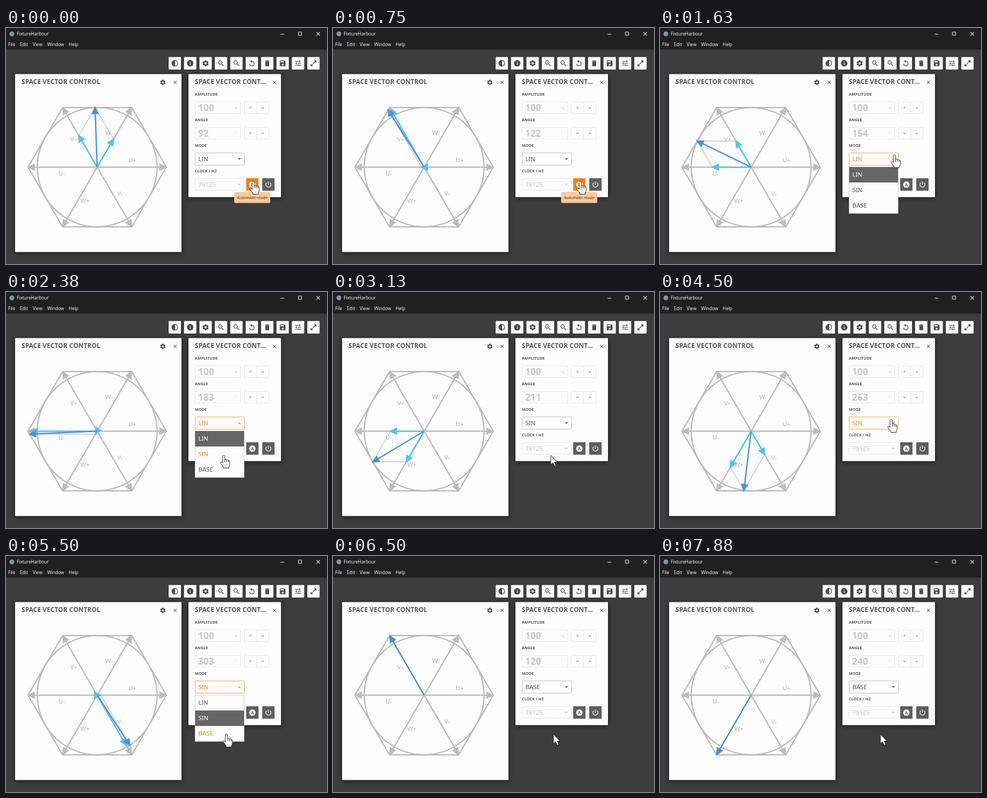
An HTML page that plays this animation: 600x443 px, repeating every 8010 ms.

```html
<!DOCTYPE html>
<html lang="en">
<head>
<meta charset="utf-8">
<title>Space vector control</title>
<style>
  html, body { margin: 0; width: 100%; height: 100%; overflow: hidden; background: #3d3d3d; }
  svg { display: block; }
  text { font-family: 'Noto Sans', sans-serif; font-size: 11.4px; fill: #555; }
  .menu text { font-family: 'Open Sans', sans-serif; font-size: 8.4px; fill: #fff; }
  .panel { fill: #fdfdfd; filter: drop-shadow(0 2px 4px #0009); }
  .title { font-size: 12px; font-weight: 600; letter-spacing: .05px; }
  .label { font-size: 7.2px; font-weight: 600; letter-spacing: .1px; }
  .value { font-size: 17.4px; font-weight: 600; fill: #c9c9c9; }
  .pale { fill: #c4c4c4; }
  .box { fill: none; stroke: #e6e6e6; }
  .grid { fill: none; stroke: #bcbcbc; stroke-width: 2.5; }
  .axis { stroke: #bcbcbc; fill: #bcbcbc; }
  .axisname { fill: #b2b2b2; }
  .part { stroke: #4bc5f2; fill: #4bc5f2; }
  .sum { stroke: #4a93d8; fill: #4a93d8; }
</style>
</head>
<body>
<svg id="stage" width="600" height="443" viewBox="0 0 600 443"></svg>
<script>
const CX = 170.4, CY = 261.3, SIDE = 129.3, INNER = SIDE * Math.sqrt(3) / 2;
const ORANGE = '#e8871e', MODES = ['LIN', 'SIN', 'BASE'];
const rad = deg => deg * Math.PI / 180;

const lens = 'M15.5 14h-.79l-.28-.27C15.41 12.59 16 11.11 16 9.5 16 5.91 13.09 3 9.5 3S3 5.91 3 9.5 5.91 16 9.5 16c1.61 0 3.09-.59 4.23-1.57l.27.28v.79l5 4.99L20.49 19l-4.99-5zm-6 0C7.01 14 5 11.99 5 9.5S7.01 5 9.5 5 14 7.01 14 9.5 11.99 14 9.5 14z';
const icons = {
  contrast: 'M12 22c5.52 0 10-4.48 10-10S17.52 2 12 2 2 6.48 2 12s4.48 10 10 10zm1-17.93c3.94.49 7 3.85 7 7.93s-3.05 7.44-7 7.93V4.07z',
  info: 'M12 2C6.48 2 2 6.48 2 12s4.48 10 10 10 10-4.48 10-10S17.52 2 12 2zm1 15h-2v-6h2v6zm0-8h-2V7h2v2z',
  gear: 'M19.14 12.94c.04-.3.06-.61.06-.94 0-.32-.02-.64-.07-.94l2.03-1.58c.18-.14.23-.41.12-.61l-1.92-3.32c-.12-.22-.37-.29-.59-.22l-2.39.96c-.5-.38-1.03-.7-1.62-.94l-.36-2.54c-.04-.24-.24-.41-.48-.41h-3.84c-.24 0-.43.17-.47.41l-.36 2.54c-.59.24-1.13.57-1.62.94l-2.39-.96c-.22-.08-.47 0-.59.22L2.74 8.87c-.12.21-.08.47.12.61l2.03 1.58c-.05.3-.09.63-.09.94s.02.64.07.94l-2.03 1.58c-.18.14-.23.41-.12.61l1.92 3.32c.12.22.37.29.59.22l2.39-.96c.5.38 1.03.7 1.62.94l.36 2.54c.05.24.24.41.48.41h3.84c.24 0 .44-.17.47-.41l.36-2.54c.59-.24 1.13-.56 1.62-.94l2.39.96c.22.08.47 0 .59-.22l1.92-3.32c.12-.22.07-.47-.12-.61l-2.01-1.58zM12 15.6c-1.98 0-3.6-1.62-3.6-3.6s1.62-3.6 3.6-3.6 3.6 1.62 3.6 3.6-1.62 3.6-3.6 3.6z',
  zoomIn: lens + 'M12 10h-2v2H9v-2H7V9h2V7h1v2h2v1z',
  zoomOut: lens + 'M7 9h5v1H7z',
  reset: 'M12 5V1L7 6l5 5V7c3.31 0 6 2.69 6 6s-2.69 6-6 6-6-2.69-6-6H4c0 4.42 3.58 8 8 8s8-3.58 8-8-3.58-8-8-8z',
  trash: 'M6 19c0 1.1.9 2 2 2h8c1.1 0 2-.9 2-2V7H6v12zM19 4h-3.5l-1-1h-5l-1 1H5v2h14V4z',
  save: 'M17 3H5c-1.11 0-2 .9-2 2v14c0 1.1.89 2 2 2h14c1.1 0 2-.9 2-2V7l-4-4zm-5 16c-1.66 0-3-1.34-3-3s1.34-3 3-3 3 1.34 3 3-1.34 3-3 3zm3-10H5V5h10v4z',
  tune: 'M3 17v2h6v-2H3zM3 5v2h10V5H3zm10 16v-2h8v-2h-8v-2h-2v6h2zM7 9v2H3v2h4v2h2V9H7zm14 4v-2H11v2h10zm-6-4h2V7h4V5h-4V3h-2v6z',
  expand: 'M21 11V3h-8l3.29 3.29-10 10L3 13v8h8l-3.29-3.29 10-10z'
};
const power = 'M13 3h-2v10h2V3zm4.83 2.17l-1.42 1.42C17.99 7.86 19 9.81 19 12c0 3.87-3.13 7-7 7s-7-3.13-7-7c0-2.19 1.01-4.14 2.58-5.42L6.17 5.17C4.23 6.82 3 9.26 3 12c0 4.97 4.03 9 9 9s9-4.03 9-9c0-2.74-1.23-5.18-3.17-6.83z';

// Markup helpers
const text = (x, y, s, attrs = '') => `<text x="${x}" y="${y}" ${attrs}>${s}</text>`;
const rect = (x, y, w, h, attrs = '') => `<rect x="${x}" y="${y}" width="${w}" height="${h}" ${attrs}/>`;
const icon = (d, x, y, size, fill = '#4c4c4c') =>
  `<path d="${d}" fill="${fill}" transform="translate(${x - size / 2} ${y - size / 2}) scale(${size / 24})"/>`;
const cross = (x, y, r, color) =>
  `<path d="M${x - r} ${y - r}l${2 * r} ${2 * r}m0 ${-2 * r}l${-2 * r} ${2 * r}" stroke="${color}" stroke-width="1.1"/>`;
const caret = (x, y, up) => `M${x - 3} ${y + (up ? 1.5 : -1.5)}h6l-3 ${up ? -3 : 3}z`;
const arrowPath = len => `M0 0H${Math.max(0, len - 6)}M${len} 0l-11 -5v10z`;
const arrow = (attrs, len = 0, deg = 0) =>
  `<path ${attrs} d="${arrowPath(len)}" stroke-width="2.5" transform="translate(${CX} ${CY}) rotate(${-deg})"/>`;
const corners = [0, 60, 120, 180, 240, 300];
const at = (len, deg) => [CX + len * Math.cos(rad(deg)), CY - len * Math.sin(rad(deg))];

const numberField = (y, id, value, unit) =>
  rect(353.5, y + .5, 85, 22, 'class="box"') +
  text(359, y + 18, value, `class="value" id="${id}"`) +
  text(427, y + 14.5, unit, 'class="pale" style="font-size:7px"') +
  rect(445.5, y + .5, 46, 22, 'class="box"') +
  `<path class="box" d="M468.5 ${y}v23"/><path fill="#aaa" d="${caret(457, y + 12)}${caret(480, y + 11.5, true)}"/>`;

document.getElementById('stage').innerHTML = `
  <rect width="600" height="443" fill="#3d3d3d"/>
  <rect width="600" height="40.5" fill="#202020"/>
  <g class="menu">
    <circle cx="11" cy="11" r="4.5" fill="#7d98a6"/>
    ${text(20, 14, 'FixtureHarbour')}
    ${[[4, 'File'], [26, 'Edit'], [50, 'View'], [77, 'Window'], [117, 'Help']].map(([x, s]) => text(x, 34, s)).join('')}
  </g>
  <path d="M513 11.5h7M546.5 7.5h6v6h-6z" fill="none" stroke="#eee"/>${cross(583.5, 11, 3.3, '#eee')}
  ${Object.values(icons).map((d, i) => {
    const x = 315.5 + 28.8 * i;
    return rect(x - 11.5, 54.5, 23, 23.5, 'fill="#fdfdfd" rx="1"') + icon(d, x, 66.3, 14.5);
  }).join('')}

  ${rect(17, 86.5, 311, 334, 'class="panel" rx="1"')}
  ${text(29, 105, 'SPACE VECTOR CONTROL', 'class="title"')}
  ${icon(icons.gear, 293.2, 102, 12.5)}${cross(316.3, 102, 2.6, '#555')}
  <polygon class="grid" points="${corners.map(a => at(SIDE, a)).join(' ')}"/>
  <circle class="grid" cx="${CX}" cy="${CY}" r="${INNER}"/>
  <g stroke-width="2.5">${corners.map(a => arrow('class="axis" style="stroke-linejoin:miter" stroke-opacity="1"', SIDE - 1, a)).join('')}</g>
  ${[[229, 252, 'U+'], [98, 276.5, 'U-'], [120, 213, 'V+'], [185.5, 201, 'W-'], [208, 315, 'V-'], [139, 327.5, 'W+']]
    .map(([x, y, s]) => text(x, y, s, 'class="axisname"')).join('')}
  <path id="frame" fill="none" stroke="#bcbcbc" stroke-width="1.2"/>
  ${arrow('id="partA" class="part"')}${arrow('id="partB" class="part"')}${arrow('id="sum" class="sum"')}

  ${rect(341, 86.5, 173, 231, 'class="panel" rx="1"')}
  ${text(353, 105, 'SPACE VECTOR CONT…', 'class="title"')}${cross(502, 102, 2.6, '#555')}
  ${['AMPLITUDE', 'ANGLE', 'MODE', 'CLOCK / HZ'].map((s, i) => text(353, 127 + 48 * i, s, 'class="label"')).join('')}
  ${numberField(138, 'amplitude', 100, '%')}${numberField(186, 'angle', '', '°')}
  ${rect(353.5, 234.5, 92, 23, 'id="select" fill="#fdfdfd" rx="1"')}
  ${text(359.5, 249.5, '', 'id="mode"')}<path id="caret"/>
  ${rect(353.5, 282.5, 91, 22, 'class="box"')}
  ${text(359.5, 297.8, '78125', 'class="pale"')}<path class="pale" d="${caret(436, 294)}"/>
  ${rect(449, 282, 23, 23.5, 'id="auto" rx="1"')}
  <circle cx="460.5" cy="294" r="6" fill="#fff"/>
  ${text(460.5, 297.1, 'A', 'id="autoA" text-anchor="middle" style="font-size:8.5px;font-weight:700"')}
  ${rect(479, 282, 23, 23.5, 'fill="#5e5e5e" rx="1"')}${icon(power, 490.5, 294, 14, '#fff')}
  <g id="list">
    ${rect(353.5, 261, 91.5, 87, 'fill="#fdfdfd" stroke="#ccc"')}
    ${MODES.map((s, i) => rect(353.5, 261 + 29 * i, 91.5, 29, 'class="row"') + text(359.5, 279 + 29 * i, s, 'class="item"')).join('')}
  </g>
  <g id="tip">
    ${rect(426.5, 308, 67.5, 20.5, 'rx="3" fill="#f8ca98"')}
    ${text(432, 320.7, 'Automatic mode', 'style="font-size:7.3px;fill:#333"')}
  </g>
  <g id="pointer" fill="#fff" stroke="#222" stroke-linejoin="round">
    <path id="hand" d="M-2 1.5C-2-.8 2-.8 2 1.5V8.5C3-.0 0 0 2 8.5C3 7 5.3 7.4 5.5 9.2C6.6 8 8.6 8.6 8.8 10.2C10 9.4 11.3 10.2 11.2 12V17C11.2 20 9.5 20.5 9.3 24H-.2C-.5 21-3.5 18.5-6 14.3C-6.8 12.5-4.6 11.5-3.3 13L-2 14.5ZM2 8.5V13M5.5 9.2V13M8.8 10.2V13.5"/>
    <path id="plain" d="M0 0V17.8L4.1 14.1 6.9 20.6 9.8 19.3 7 13H12.4Z"/>
  </g>`;

const el = Object.fromEntries([...document.querySelectorAll('[id]')].map(e => [e.id, e]));
const rows = document.querySelectorAll('.row'), items = document.querySelectorAll('.item');
const set = (e, attrs) => { for (const k in attrs) e.setAttribute(k, attrs[k]); };
const show = (e, on) => set(e, { visibility: on ? 'visible' : 'hidden' });
el.hand.setAttribute('d', 'M-2 1.5C-2-.8 2-.8 2 1.5V8.5C3 7 5.3 7.4 5.5 9.2C6.6 8 8.6 8.6 8.8 10.2C10 9.4 11.3 10.2 11.2 12V17C11.2 20 9.5 20.5 9.3 24H-.2C-.5 21-3.5 18.5-6 14.3C-6.8 12.5-4.6 11.5-3.3 13L-2 14.5ZM2 8.5V13M5.5 9.2V13M8.8 10.2V13.5');

const LOOP = 8010, STEP = 125, BASE_START = 5625;
const angleKeys = [[0, 92], [750, 122], [1625, 154], [3125, 211], [4500, 263], [5500, 303], [5625, 308]];
const pointerKeys = [[0, 462, 288], [875, 462, 288], [1375, 438, 238], [1750, 438, 238], [2125, 407, 306.5],
  [3750, 407, 306.5], [4375, 432, 239.5], [4875, 432, 239.5], [5375, 412, 334.5], [LOOP, 412, 334.5]];

function sample(keys, t, ease = u => u) {
  const i = Math.max(1, keys.findIndex(k => k[0] > t)), a = keys[i - 1], b = keys[i];
  const u = ease(Math.min(1, (t - a[0]) / (b[0] - a[0])));
  return a.slice(1).map((v, j) => v + (b[j + 1] - v) * u);
}

function drawVectors(mode, angle) {
  const d = angle % 60, first = angle - d, base = mode === 2;
  const len = base ? SIDE - 1 : mode ? INNER : INNER / Math.cos(rad(d - 30));
  const a = len * Math.sin(rad(60 - d)) / Math.sin(rad(60));
  const b = len * Math.sin(rad(d)) / Math.sin(rad(60));
  const place = (e, l, deg) => set(e, { d: arrowPath(l), transform: `translate(${CX} ${CY}) rotate(${-deg})` });
  place(el.sum, len, angle);
  place(el.partA, a, first);
  place(el.partB, b, first + 60);
  set(el.frame, { d: `M${at(a, first)}L${at(len, angle)}L${at(b, first + 60)}` });
  for (const e of [el.partA, el.partB, el.frame]) show(e, !base);
}

function draw(now) {
  const t = Math.min(63, Math.floor(now % LOOP / STEP)) * STEP;
  const mode = t >= BASE_START ? 2 : t >= 2500 ? 1 : 0;
  const open = t >= 1500 && t < 2500 || t >= 4625 && t < BASE_START;
  const angle = mode === 2 ? 60 * (1 + Math.floor((t - BASE_START) / 750)) : sample(angleKeys, t)[0];
  drawVectors(mode, angle);
  el.angle.textContent = Math.round(angle);

  const [x, y] = sample(pointerKeys, t, u => u * u * (3 - 2 * u));
  const inside = (l, tp, r, b) => x >= l && x <= r && y >= tp && y <= b;
  const onAuto = inside(449, 282, 472, 305), onSelect = inside(353, 234, 445, 258);
  const hovered = open && inside(353, 261, 445, 348) ? Math.floor((y - 261) / 29) : -1;
  const clickable = onAuto || onSelect || hovered >= 0;
  set(el.pointer, { transform: `translate(${x} ${y})` });
  show(el.hand, clickable);
  show(el.plain, !clickable);

  const hot = open || onSelect;
  set(el.select, { stroke: hot ? '#efa84f' : '#bdbdbd' });
  el.mode.textContent = MODES[mode];
  el.mode.style.fill = hot ? ORANGE : '#555';
  set(el.caret, { d: caret(436.3, 246, open), fill: hot ? ORANGE : '#555' });
  show(el.list, open);
  items.forEach((item, i) => {
    set(rows[i], { fill: i === mode ? '#666' : 'none' });
    item.style.fill = i === mode ? '#fff' : i === hovered ? ORANGE : '#555';
  });

  const autoColor = onAuto ? '#f5820f' : '#5e5e5e';
  set(el.auto, { fill: autoColor });
  el.autoA.style.fill = autoColor;
  show(el.tip, onAuto);
}

const start = performance.now();
(function tick() {
  draw(performance.now() - start);
  requestAnimationFrame(tick);
})();
</script>
</body>
</html>
```
